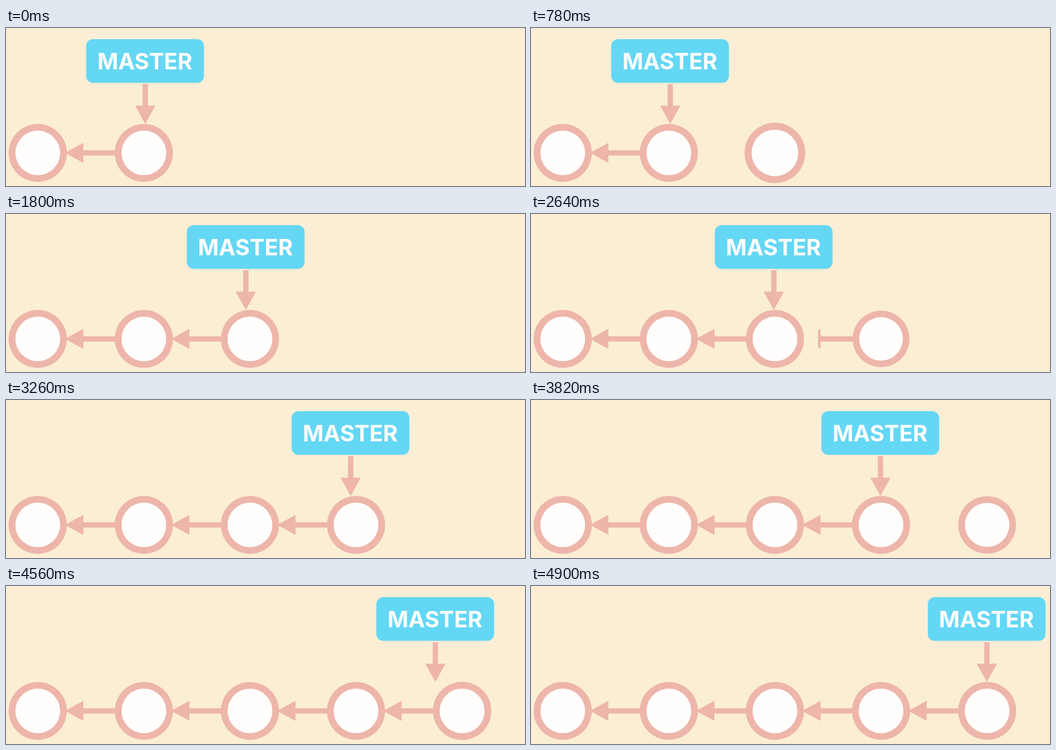
Recreate the animation shown at these times as an HTML page with a canvas. Size 974 by 298 pixels, loop 5120 ms.

```html
<!DOCTYPE html>
<html lang="en">
<head>
<meta charset="utf-8">
<title>Branch pointer</title>
<style>
  html, body { margin: 0; overflow: hidden; background: #fbeed4; }
  canvas { display: block; }
</style>
</head>
<body>
<canvas id="stage" width="974" height="298"></canvas>
<script>
const ctx = document.getElementById('stage').getContext('2d');
const LOOP = 5120, SPACING = 199.1, ROW = 235.6;
const BG = '#fbeed4', PINK = '#eeb5aa', BLUE = '#64d7f5', WHITE = '#fffefd';

// Times in ms: when the node pops in, its arrow grows and the label slides to labelX.
const steps = [
  { pop: 360, arrow: 952, slide: 1213, slideFor: 719, labelX: 454.5 },
  { pop: 2000, arrow: 2297, slide: 2544, slideFor: 923, labelX: 655.5 },
  { pop: 3640, arrow: 3894, slide: 4090, slideFor: 780, labelX: 855.2 }
];

const progress = (t, start, length) => Math.min(1, Math.max(0, (t - start) / length));
const easeInOut = u => u < .5 ? 4 * u ** 3 : 1 - 4 * (1 - u) ** 3;

// Damped spring from 0 to 1 that peaks about 20% too high.
function spring(ms) {
  if (ms <= 0) return 0;
  const decay = 5.84, freq = Math.PI / .28, s = ms / 1000;
  return 1 - Math.exp(-decay * s) * (Math.cos(freq * s) + decay / freq * Math.sin(freq * s));
}

function disc(x, r, color) {
  ctx.fillStyle = color;
  ctx.beginPath();
  ctx.arc(x, ROW, r, 0, 2 * Math.PI);
  ctx.fill();
}

function node(x, scale) {
  disc(x, 54.6 * scale, PINK);
  disc(x, 42 * scale, WHITE);
}

// Arrow pointing along +x, from the tail to a tip at 0.
function arrow(x, y, angle, tail) {
  ctx.save();
  ctx.translate(x, y);
  ctx.rotate(angle);
  ctx.fillStyle = PINK;
  ctx.fillRect(tail, -5, -34 - tail, 10);
  ctx.beginPath();
  ctx.moveTo(0, 0);
  ctx.lineTo(-34.5, -19);
  ctx.lineTo(-34.5, 19);
  ctx.fill();
  ctx.restore();
}

// Arrow to the previous node, uncovered from right to left.
function link(x, shown) {
  const left = x - 52 - 96 * shown;
  ctx.save();
  ctx.beginPath();
  ctx.rect(left, 0, x - left, 298);
  ctx.clip();
  arrow(x - 148, ROW, Math.PI, -148);
  ctx.restore();
}

function label(x) {
  arrow(x + .3, 181, Math.PI / 2, -75);
  ctx.fillStyle = BLUE;
  ctx.beginPath();
  ctx.roundRect(x - 110.5, 21, 221, 82.6, 13);
  ctx.fill();
  ctx.fillStyle = WHITE;
  ctx.font = '700 42px Inter, sans-serif';
  ctx.textAlign = 'center';
  ctx.fillText('MASTER', x - .5, 77.5);
}

function draw(t) {
  ctx.fillStyle = BG;
  ctx.fillRect(0, 0, 974, 298);
  const nodeX = i => 59.6 + SPACING * i;
  link(nodeX(1), 1);
  node(nodeX(0), 1);
  node(nodeX(1), 1);

  let x = 261;
  steps.forEach((s, i) => {
    const cx = nodeX(i + 2);
    if (t > s.arrow) link(cx, easeInOut(progress(t, s.arrow, 600)));
    node(cx, spring(t - s.pop));
    x += (s.labelX - x) * easeInOut(progress(t, s.slide, s.slideFor));
  });
  label(x);
}

const begin = performance.now();
function tick() {
  draw((performance.now() - begin) % LOOP);
  requestAnimationFrame(tick);
}
tick();
</script>
</body>
</html>
```
